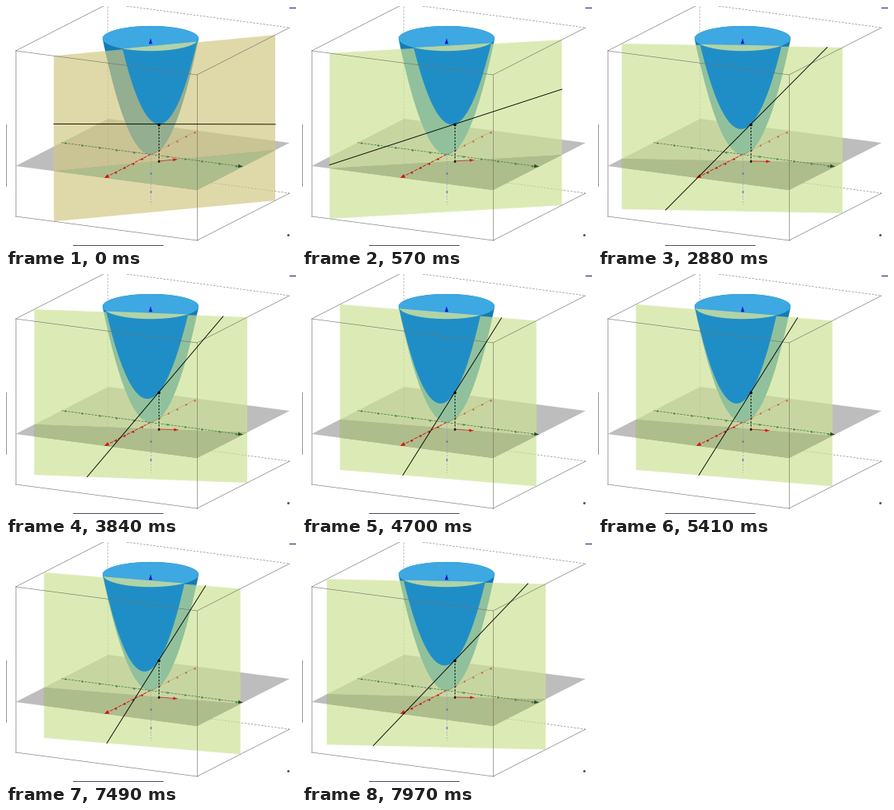
A matplotlib script that plays this animation: 363x300 px, repeating every 8000 ms.

```python
import numpy as np
import matplotlib.pyplot as plt
from matplotlib.animation import FuncAnimation

W, H, DPI = 363, 300, 100
LOOP, STEP = 8000, 20

# Orthographic view: screen position of the origin and of each unit vector
ORIGIN = np.array([181, 185.5])
BASIS = np.array([[-10.94, 5.57], [21.4, 2.83], [0, -23.15]])

X0, X1 = -5.34, 5.25
Y0, Y1 = -5.21, 5.40
Z0, Z1 = -2.72, 6.22
RIM_Z = 6.26
RIM = RIM_Z ** 0.5

# The slider is dragged in bursts: start, end, steps, angle reached
START_ANGLE = 136.9
DRAGS = [
    (100, 200, 3, 131.5), (350, 700, 4, 127.5), (860, 1170, 4, 124),
    (1310, 1420, 2, 122), (1780, 1910, 2, 121), (2060, 2260, 3, 119.8),
    (2780, 2880, 2, 113), (3010, 3360, 4, 110), (3840, 3840, 1, 108.8),
    (4230, 4340, 2, 106), (4490, 4700, 3, 99.2), (5790, 6030, 3, 93.5),
    (6250, 6250, 1, 87.6), (6380, 6510, 2, 87), (7110, 7110, 1, 93.5),
    (7260, 7490, 3, 99.2), (7610, 7610, 1, 101), (7760, 7970, 3, 112),
]

PLANE_ALPHA = 0.68
GREEN = np.array([204, 226, 146]) / 255
TAN = np.array([209, 199, 128]) / 255
BLUE = "#208ec6"
BACK_BLUE = "#147cb4"
INNER = "#3da8e2"
CAP = "#b0d3a8"
GROUND = "#464446"
GREEN_GROUND = "#aebd8c"
RED = "#d81818"
DARK_GREEN = "#3a7546"


def angle_at(t):
    angle = START_ANGLE
    for start, end, steps, goal in DRAGS:
        if t < start:
            break
        times = np.linspace(start, end, steps)
        angle += (goal - angle) * np.sum(times <= t) / steps
    return angle


def project(points):
    return ORIGIN + np.asarray(points, float) @ BASIS


def hull(points):
    """Convex outline of a 2D point cloud."""
    pts = sorted(map(tuple, points))

    def half(seq):
        out = []
        for p in seq:
            while len(out) > 1 and (
                (out[-1][0] - out[-2][0]) * (p[1] - out[-2][1])
                <= (out[-1][1] - out[-2][1]) * (p[0] - out[-2][0])
            ):
                out.pop()
            out.append(p)
        return out[:-1]

    return np.array(half(pts) + half(pts[::-1]))


def clip_side(poly, normal, offset):
    """Keep the part of a flat polygon where normal . p >= offset."""
    out = []
    for a, b in zip(poly, np.roll(poly, -1, axis=0)):
        da, db = a[:2] @ normal - offset, b[:2] @ normal - offset
        if da >= 0:
            out.append(a)
        if da * db < 0:
            out.append(a + (b - a) * da / (da - db))
    return np.array(out)


def inside_range(u):
    """Range of t for which (1, 1) + t u stays inside the box."""
    lo, hi = -99.0, 99.0
    for d, a, b in ((u[0], X0, X1), (u[1], Y0, Y1)):
        if abs(d) > 1e-9:
            ends = sorted(((a - 1) / d, (b - 1) / d))
            lo, hi = max(lo, ends[0]), min(hi, ends[1])
    return lo, hi


def circle(r, n=90):
    phi = np.linspace(0, 2 * np.pi, n, endpoint=False)
    return np.column_stack([r * np.cos(phi), r * np.sin(phi), np.full(n, r * r)])


SURFACE = np.vstack([circle(r, 60) for r in np.linspace(0.1, RIM, 16)])
RIM_POINTS = circle(RIM, 120)
FLOOR = np.array([[X1, Y0, 0], [X1, Y1, 0], [X0, Y1, 0], [X0, Y0, 0]])

fig = plt.figure(figsize=(W / DPI, H / DPI), dpi=DPI, facecolor="white")
ax = fig.add_axes([0, 0, 1, 1])
ax.set_xlim(0, W)
ax.set_ylim(H, 0)
ax.axis("off")


def px(n):
    return n * 72 / DPI


def fill(color, z, points=((0, 0), (0, 0), (0, 0)), alpha=1):
    return ax.add_patch(plt.Polygon(points, fc=color, ec="none", alpha=alpha, zorder=z))


def stroke(points, color, width, z, style="-"):
    x, y = np.transpose(points)
    return ax.plot(x, y, color=color, lw=px(width), ls=style, zorder=z)[0]


def dots(points, color, size, z):
    x, y = np.transpose(points)
    ax.plot(x, y, "o", color=color, ms=px(size), mew=0, zorder=z)


def head(tip, direction, length, width):
    """Triangle for an arrow that ends at tip."""
    d = np.asarray(direction, float)
    d = d / np.hypot(*d)
    side = np.array([-d[1], d[0]]) * width / 2
    base = tip - d * length
    return np.array([tip, base + side, base - side])


def draw_box():
    def edge(a, b, z, style="-", color="#707070"):
        stroke(project([a, b]), color, 0.6, z, style)

    dashed = (0, (4, 3))
    for z in (Z0, Z1):
        edge((X1, Y0, z), (X1, Y1, z), 12)
        edge((X1, Y1, z), (X0, Y1, z), 12)
        edge((X0, Y0, z), (X0, Y1, z), 1, dashed)
    edge((X1, Y0, Z1), (X0, Y0, Z1), 1)
    edge((X1, Y0, Z0), (X1, Y0, Z1), 12)
    edge((X1, Y1, Z0), (X1, Y1, Z1), 12, color="#7a6a5c")
    stroke([(126.5, 0), (126.5, 203)], "#909090", 0.6, 1, dashed)


def draw_axes():
    ticks = np.arange(1, 6)[:, None]
    ex, ey, ez = np.eye(3)

    stroke(project([0 * ex, X1 * ex]), RED, 0.9, 8, (0, (5, 1.5)))
    stroke(project([0 * ex, X0 * ex]), "#c07850", 0.6, 8, (0, (2, 2)))
    dots(project(ticks * ex), "#b81818", 2.4, 8)
    dots(project(-ticks * ex), "#c05a38", 2.2, 8)
    fill(RED, 9, head(project(5.3 * ex), BASIS[0], 6, 5))

    stroke(project([Y0 * ey, Y1 * ey]), DARK_GREEN, 0.7, 8, (0, (4, 2)))
    dots(project(np.vstack([ticks, -ticks]) * ey), DARK_GREEN, 2.2, 8)
    fill("#1d4d2a", 9, head(project(5.4 * ey), BASIS[1], 6, 4.5))

    stroke(project([0 * ez, Z0 * ez]), "#8a94c0", 0.6, 8, (0, (3, 3)))
    dots(project(-ticks[:2] * ez), "#5a64c0", 2.2, 8)
    fill("#1418d0", 14, head(project(6.27 * ez), BASIS[2], 7, 4.5))


def draw_window_marks():
    stroke([(0.3, 148), (0.3, 225)], "#777780", 0.8, 20)
    stroke([(84, 299.3), (196, 299.3)], "#55556a", 1.2, 20)
    stroke([(355, 1.5), (362, 1.5)], "#404a80", 1.4, 20)
    dots([(353, 286)], "#555555", 3, 20)


draw_box()
draw_axes()
draw_window_marks()

floor_back = fill(GROUND, 2, alpha=0.35)
fill(BACK_BLUE, 3, hull(project(SURFACE)))
fill(INNER, 4, project(RIM_POINTS))
plane = fill(GREEN, 5, alpha=PLANE_ALPHA)
floor_front = fill(GROUND, 6, alpha=0.35)
floor_tinted = fill(GREEN_GROUND, 7)
floor_tinted.set_clip_path(plane)
front = fill(BLUE, 10)
cap = fill(CAP, 11)

tangent = stroke([(0, 0), (1, 1)], "black", 0.9, 15)
foot, point = project([(1, 1, 0), (1, 1, 2)])
stroke([foot, point], "black", 0.9, 15, (0, (2.5, 2)))
dots([point], "black", 3.6, 16)
dots([foot], "#201010", 2.8, 16)
arrow = stroke([(0, 0), (1, 1)], "#c03028", 0.8, 14)
arrow_head = fill(RED, 14)


def update(i):
    angle = angle_at(i * STEP + STEP / 2)
    th = np.radians(angle)
    u = np.array([np.cos(th), np.sin(th)])
    normal = np.array([u[1], -u[0]])
    offset = normal.sum()

    def on_plane(t, z):
        t, z = np.broadcast_arrays(np.asarray(t, float), z)
        return np.column_stack([1 + t * u[0], 1 + t * u[1], z])

    lo, hi = inside_range(u)
    plane.set_xy(project(on_plane([lo, hi, hi, lo], [Z0, Z0, Z1, Z1])))
    mix = np.clip((angle - 131.5) / 5, 0, 1)
    plane.set_facecolor(GREEN + (TAN - GREEN) * mix)

    near_floor = project(clip_side(FLOOR, normal, offset))
    floor_front.set_xy(near_floor)
    floor_tinted.set_xy(near_floor)
    floor_back.set_xy(project(clip_side(FLOOR, -normal, -offset)))

    # Section parabola z = 2 + slope t + t^2, up to the rim
    slope = 2 * u.sum()
    root = np.sqrt(slope ** 2 / 4 + RIM_Z - 2)
    t = np.linspace(-slope / 2 - root, -slope / 2 + root, 60)
    section = on_plane(t, 2 + slope * t + t * t)
    near = SURFACE[SURFACE[:, :2] @ normal >= offset]
    front.set_xy(hull(project(np.vstack([section, near]))))
    cap.set_xy(project(clip_side(RIM_POINTS, normal, offset)))

    cuts = sorted(((Z0 - 2) / slope, (Z1 - 2) / slope)) if abs(slope) > 1e-6 else (lo, hi)
    ends = np.array([max(lo, cuts[0]), min(hi, cuts[1])])
    tangent.set_data(*project(on_plane(ends, 2 + slope * ends)).T)

    tip = project([1 + u[0], 1 + u[1], 0])
    arrow.set_data(*np.transpose([foot, tip]))
    arrow_head.set_xy(head(tip, tip - foot, 5, 4))
    return []


anim = FuncAnimation(fig, update, frames=LOOP // STEP, interval=STEP,
                     init_func=lambda: update(0), repeat=True, repeat_delay=0)
plt.show()
```
